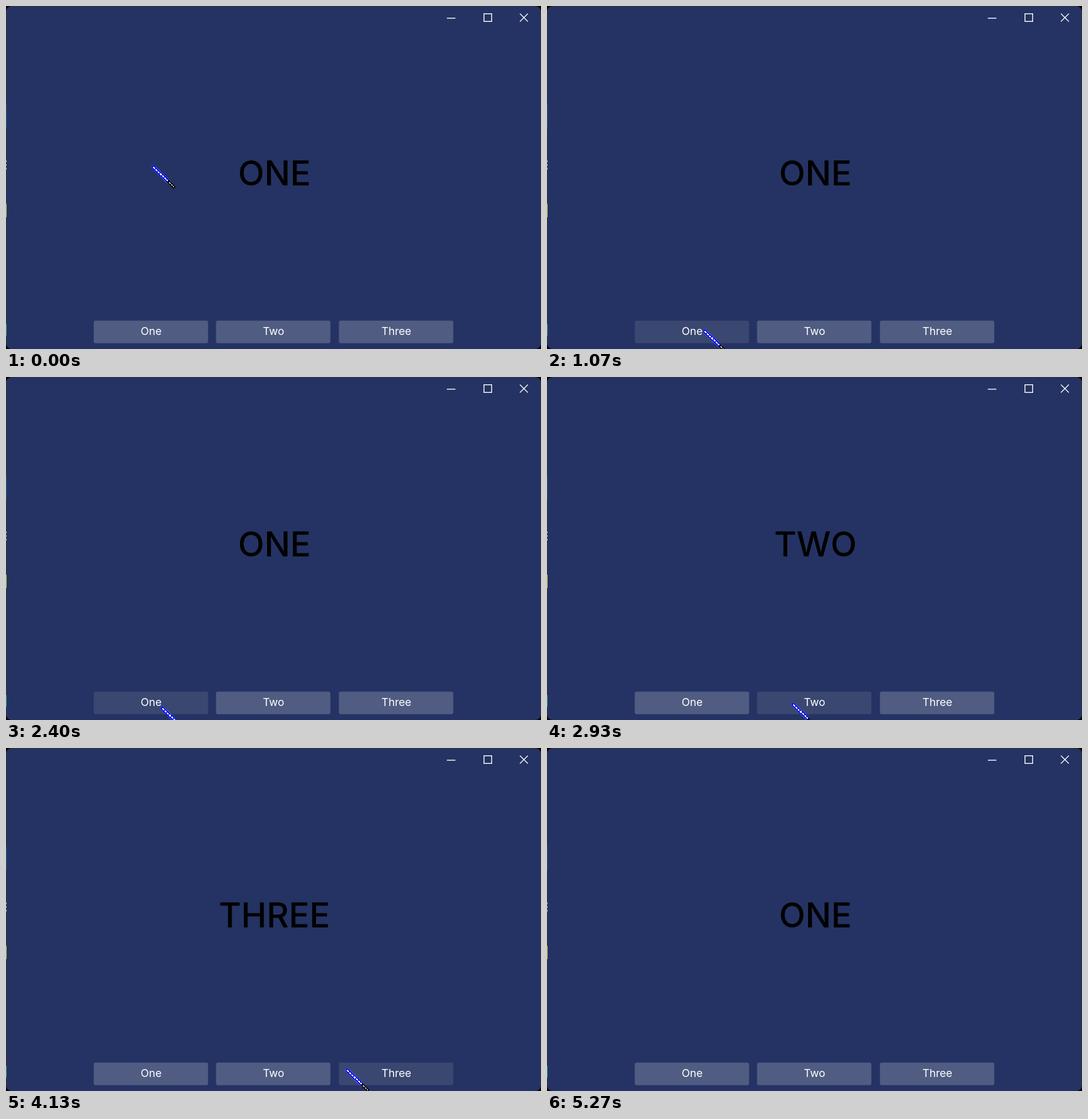
An HTML page that plays this animation: 875x562 px, repeating every 6070 ms.

```html
<!DOCTYPE html>
<html lang="en">
<head>
<meta charset="utf-8">
<title>Three buttons</title>
<style>
  html, body { margin: 0; width: 100%; height: 100%; overflow: hidden; background: #000; }
  svg { display: block; width: 875px; height: 562px; }
  text { font-family: Inter, Roboto, sans-serif; text-anchor: middle; font-optical-sizing: none; }
  #label { font-size: 56px; font-weight: 500; }
  .button text { font-size: 17.7px; fill: #fff; }
  .button rect { fill: #505c81; }
  .button.hover rect { fill: #3a4770; }
  .controls { fill: none; stroke: #fff; stroke-width: 1.4; }
  .saber { fill: none; shape-rendering: crispEdges; }
</style>
</head>
<body>
<svg viewBox="0 0 875 562">
  <rect width="875" height="562" rx="9" fill="#30333b"/>
  <rect x="1" y="1" width="873" height="561" rx="9" fill="#243363"/>

  <!-- slivers of the desktop behind the window -->
  <path d="M.5 162V201" stroke="#295a7c"/>
  <path d="M.5 253V269" stroke="#b5b8bd" stroke-dasharray="3 3"/>
  <path d="M.5 324V346" stroke="#c5c832"/>
  <path d="M.5 521V540" stroke="#45a08c"/>

  <g class="controls">
    <path d="M721 20H735"/>
    <rect x="781.7" y="12.7" width="12.6" height="12.6"/>
    <path d="M840.5 12.5L853.5 25.5M853.5 12.5L840.5 25.5"/>
  </g>

  <text id="label" x="439" y="294">ONE</text>
  <g id="buttons"></g>

  <g id="cursor" class="saber">
    <path d="M3 2L28 26" stroke="#3f5fff" stroke-width="7" stroke-linecap="round" opacity=".6"/>
    <path d="M3 2L28 26" stroke="#0000e8" stroke-width="5" stroke-linecap="round"/>
    <path d="M3 2L28 26" stroke="#fff" stroke-width="2.2" stroke-dasharray="4 1"/>
    <path d="M27 25L38 36" stroke="#000" stroke-width="4.5"/>
    <path d="M29 27L37 35" stroke="#b5b5a8" stroke-width="1.6" stroke-dasharray="3 1.5"/>
  </g>
</svg>
<script>
  const LOOP = 6070, TICK = 200 / 3;
  const TOP = 515.5, WIDTH = 187, HEIGHT = 37;

  const label = document.getElementById('label');
  const cursor = document.getElementById('cursor');
  const group = document.getElementById('buttons');

  function svg(tag, attributes, parent) {
    const node = document.createElementNS('http://www.w3.org/2000/svg', tag);
    for (const name in attributes) node.setAttribute(name, attributes[name]);
    return parent.appendChild(node);
  }

  const buttons = ['One', 'Two', 'Three'].map((name, i) => {
    const x = 143.5 + Math.floor(i * 200.5);
    const node = svg('g', { class: 'button' }, group);
    svg('rect', { x, y: TOP, width: WIDTH, height: HEIGHT, rx: 3 }, node);
    svg('text', { x: x + WIDTH / 2 + .5, y: 539 }, node).textContent = name;
    return { node, name, x };
  });

  // Eased progress between two ticks, held before and after.
  function ease(tick, from, to) {
    const k = Math.min(1, Math.max(0, (tick - from) / (to - from)));
    return k * k * (3 - 2 * k);
  }

  function pointerAt(tick) {
    let x = 238, y = 262;
    const glide = (from, to, toX, toY) => {
      const k = ease(tick, from, to);
      x += (toX - x) * k;
      y += (toY - y) * k;
    };
    glide(0, 8, 264, 512);
    glide(9, 12, 255, 531);
    glide(31, 36, 253, 541);
    glide(36, 41, 400, 535);
    glide(44, 52, 565, 529);
    glide(53, 62, 555, 526);
    glide(62, 68, 244, 524);
    glide(69, 72, 247, 537);
    glide(74, 79, 247, 572);
    return [Math.round(x), Math.round(y)];
  }

  function pressedAt(tick) {
    if (tick < 44 || tick >= 76) return buttons[0];
    return tick < 56 ? buttons[1] : buttons[2];
  }

  function draw(tick) {
    const [x, y] = pointerAt(tick);
    cursor.setAttribute('transform', `translate(${x} ${y})`);
    for (const button of buttons) {
      const inside = x >= button.x && x <= button.x + WIDTH && y >= TOP && y <= TOP + HEIGHT;
      button.node.classList.toggle('hover', inside);
    }
    label.textContent = pressedAt(tick).name.toUpperCase();
  }

  const start = performance.now();
  function frame() {
    // The small lead keeps a rounded millisecond from landing one tick early.
    const time = (performance.now() - start + 4) % LOOP;
    draw(Math.floor(time / TICK));
    requestAnimationFrame(frame);
  }
  frame();
</script>
</body>
</html>
```
